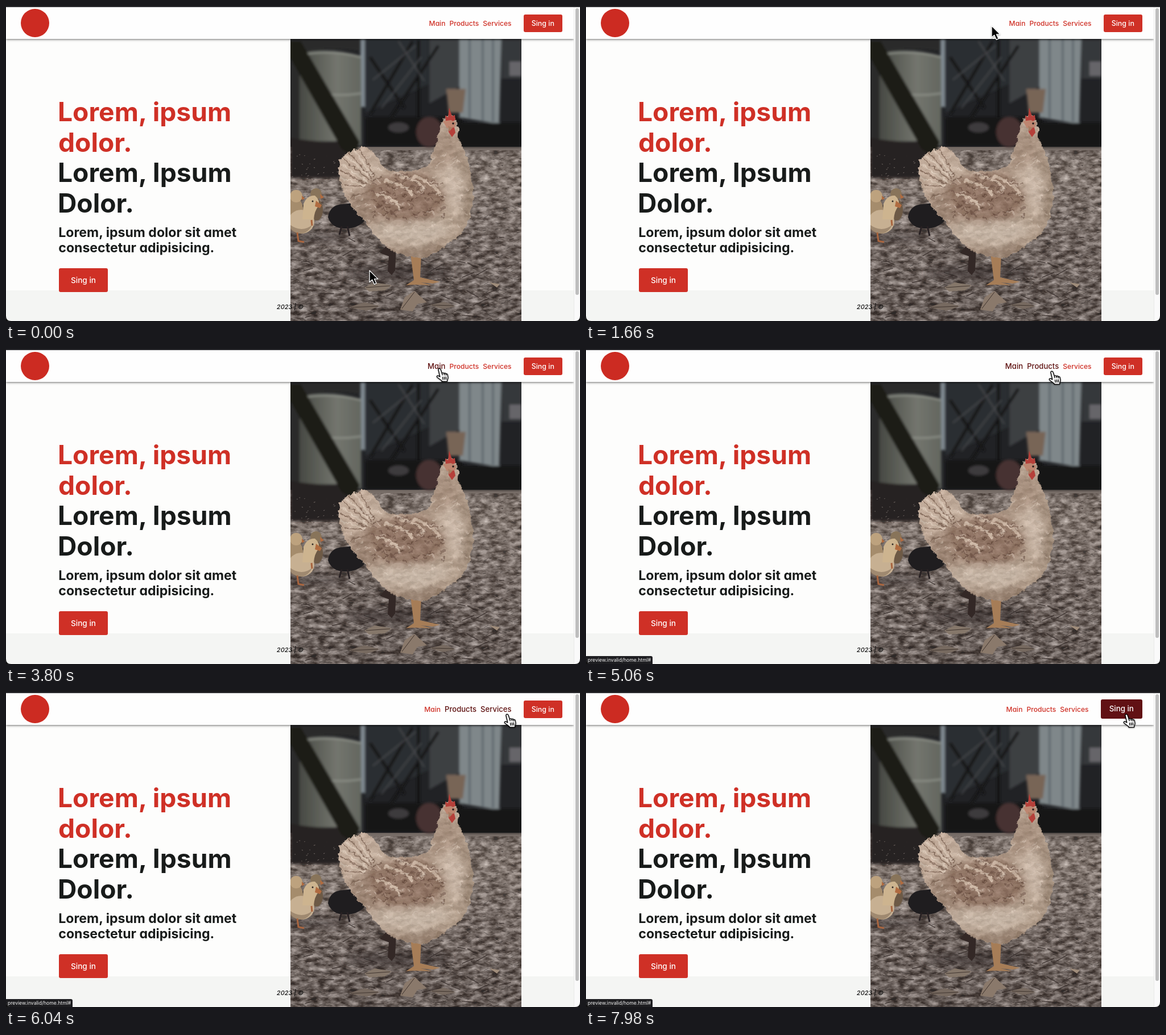
These frames come from a looping animation (1009x555 px, 8 s). An HTML page:

```html
<!DOCTYPE html>
<html lang="en">
<head>
<meta charset="utf-8">
<title>Farm landing page</title>
<style>
  :root { --red: #cf3026; --dark: #5f1211; --ink: #181b1a; }
  html, body { margin: 0; width: 100%; height: 100%; overflow: hidden; background: #fdfdfc; }
  body { position: relative; font-family: Inter, "Open Sans", sans-serif; font-feature-settings: "cv11"; }
  .scene, header, .status, .cursor { position: absolute; }
  .scene { left: 0; top: 0; width: 1009px; height: 555px; }
  .scene text { white-space: pre; }
  .title { font-size: 46.2px; font-weight: 700; }
  .lead { font-size: 23.1px; font-weight: 700; fill: var(--ink); }

  header {
    left: 0; top: 2px; width: 978px; height: 56px; padding-right: 20px;
    display: flex; align-items: center; justify-content: flex-end;
    background: #fefefe; box-shadow: 0 1px 4px rgba(0, 0, 0, .6);
  }
  .logo { position: absolute; left: 26px; top: 3px; width: 50px; height: 50px; border-radius: 50%; background: #cc2b22; }
  .link { margin-right: 7px; color: var(--red); font-size: 12.1px; font-weight: 500; white-space: nowrap; }
  .services { margin-right: 21px; }
  .button {
    height: 2.5em; line-height: 2.5em; padding: 0 1.14em; border-radius: 3px; white-space: nowrap;
    background: var(--red); color: #fff; font-size: 12.4px; font-weight: 500;
    animation: button 8s infinite;
  }
  .main { animation: main 8s infinite; }
  .products { animation: products 8s infinite; }
  .services { animation: services 8s infinite; }
  @keyframes main {
    0%, 39.5%, 69%, 100% { font-size: 12.1px; color: var(--red); }
    46.5%, 63.3% { font-size: 13.2px; color: var(--dark); }
  }
  @keyframes products {
    0%, 56.5%, 81.5%, 100% { font-size: 12.1px; color: var(--red); }
    63%, 75.6% { font-size: 13.1px; color: var(--dark); }
  }
  @keyframes services {
    0%, 69%, 90%, 100% { font-size: 12.1px; color: var(--red); }
    75.3%, 83.5% { font-size: 13.1px; color: var(--dark); }
  }
  @keyframes button {
    0%, 85% { font-size: 12.4px; background: var(--red); }
    91.5%, 100% { font-size: 13.3px; background: #611114; }
  }

  .status {
    left: 0; top: 541px; width: 117px; height: 14px; box-sizing: border-box; padding-left: 3px;
    border-radius: 0 3px 0 7px; background: #1e1e21; color: #f2f2f2;
    font: 8.6px/14px Inter, sans-serif; white-space: nowrap;
    animation: status 8s step-end infinite;
  }
  @keyframes status { 0% { opacity: 0; } 52% { opacity: 1; } }

  .cursor {
    left: 0; top: 0; width: 34px; height: 36px; overflow: visible;
    filter: drop-shadow(0 1px 1px rgba(0, 0, 0, .4));
    animation: travel 8s linear infinite;
  }
  .arrow { animation: arrow 8s step-end infinite; }
  .hand { animation: hand 8s step-end infinite; }
  @keyframes arrow { 0% { opacity: 1; } 39% { opacity: 0; } }
  @keyframes hand { 0% { opacity: 0; } 39% { opacity: 1; } }
  @keyframes travel {
    0% { transform: translate(639px, 466px); }
    3% { transform: translate(639px, 466px); animation-timing-function: ease-in-out; }
    18% { transform: translate(711px, 37px); }
    20.75% { transform: translate(713px, 35px); }
    35.25% { transform: translate(735.5px, 31.5px); }
    39% { transform: translate(744px, 32px); }
    47.5% { transform: translate(761px, 34px); }
    54% { transform: translate(764px, 35px); animation-timing-function: ease-in-out; }
    63.25% { transform: translate(818px, 39px); }
    67% { transform: translate(820px, 39px); animation-timing-function: ease-in-out; }
    75.5% { transform: translate(880px, 39px); }
    79% { transform: translate(882px, 39px); animation-timing-function: ease-in-out; }
    89% { transform: translate(947px, 39px); }
    100% { transform: translate(949px, 39px); }
  }
</style>
</head>
<body>
<svg class="scene" viewBox="0 0 1009 555">
  <defs>
    <clipPath id="frame"><path d="M500 58h406v497H500z"/></clipPath>
    <clipPath id="henShape"><use href="#hen"/></clipPath>
    <filter id="soft"><feGaussianBlur stdDeviation="2"/></filter>
    <filter id="haze" x="-30%" y="-30%" width="160%" height="160%"><feGaussianBlur stdDeviation="7"/></filter>
    <!-- Mottled light and dark over a flat area. -->
    <filter id="mottle" x="0" y="0" width="100%" height="100%" color-interpolation-filters="sRGB">
      <feTurbulence type="fractalNoise" baseFrequency=".06 .13" numOctaves="4" seed="4"/>
      <feColorMatrix values="1.5 0 0 0 -.31  1.5 0 0 0 -.35  1.5 0 0 0 -.37  0 0 0 0 .5"/>
    </filter>
    <!-- Frayed edges, like feathers. -->
    <filter id="fray" x="-5%" y="-5%" width="110%" height="110%">
      <feTurbulence type="fractalNoise" baseFrequency=".12" numOctaves="3" seed="2"/>
      <feDisplacementMap in="SourceGraphic" scale="9" xChannelSelector="R" yChannelSelector="G"/>
    </filter>
    <linearGradient id="ground" x2="0" y2="1">
      <stop offset="0" stop-color="#756b65"/><stop offset=".15" stop-color="#91857d"/>
      <stop offset=".5" stop-color="#776c67"/><stop offset="1" stop-color="#5a514e"/>
    </linearGradient>
    <linearGradient id="barrel">
      <stop offset="0" stop-color="#474943"/><stop offset=".6" stop-color="#73756e"/><stop offset="1" stop-color="#63665f"/>
    </linearGradient>
    <linearGradient id="plumage" x2="1" y2=".5">
      <stop offset="0" stop-color="#d8bfab"/><stop offset=".5" stop-color="#c9b3a0"/><stop offset="1" stop-color="#bfa995"/>
    </linearGradient>
  </defs>

  <path fill="#f4f5f3" d="M0 501h998v54H0z"/>

  <g clip-path="url(#frame)">
    <path fill="#212225" d="M500 58h406v220H500z"/>
    <path fill="url(#ground)" d="M500 248h406v307H500z"/>
    <path d="M500 254h406v301H500z" filter="url(#mottle)"/>
    <g filter="url(#soft)">
      <path fill="#2b2d30" d="M632 58h110v80l-110 50z"/>
      <path fill="#3d4043" d="M744 58h53v84l-53 30z"/>
      <path stroke="#151618" stroke-width="5" fill="none" d="M640 190L715 62M668 210L760 70M640 90l60 90M725 60v150"/>
      <path stroke="#4a4c4f" stroke-width="2" fill="none" d="M645 130l75-60M660 180l70-90M690 62l45 70"/>
      <path fill="#808a92" d="M623 58h8v120h-8z"/>
      <path fill="#7f878a" d="M797 58h74l-4 150-70-12z"/>
      <path stroke="#596166" stroke-width="3" d="M815 58v140M838 58v144M856 58v146"/>
      <path fill="#36373a" d="M872 58h34v70h-34z"/>
      <path fill="#666569" d="M885 98h21v25h-21z"/>
      <path fill="#161618" d="M632 196h170v50H632zM800 206h106v42H800z"/>
      <path fill="#786556" d="M774 146h34l-5 42h-25z"/>
      <ellipse cx="744" cy="222" rx="23" ry="27" fill="#463330"/>
      <ellipse cx="690" cy="214" rx="18" ry="9" fill="#3e3b3c"/>
      <path fill="url(#barrel)" d="M516 84q50-12 108 4l1 158H516z"/>
      <path fill="#2b2c29" d="M500 58h124v22q-60-10-108 4v170h-16z"/>
      <path stroke="#8b8e86" stroke-width="3" fill="none" d="M520 86q50-10 104 4M560 155q30 4 64-1"/>
      <path fill="#252321" d="M500 232q60 12 118 2l-6 52-30 17H500z"/>
      <path fill="#1e1a19" d="M500 62h18l104 178-10 26-22-14L500 92z"/>
    </g>
    <path id="pale" stroke="#b3a79e" stroke-opacity=".55"/>
    <path id="shade" stroke="#2f2827" stroke-opacity=".55"/>
    <path id="twigs" stroke="#352b28" stroke-opacity=".75" stroke-width="1.6"/>
    <g fill="#2d2726" opacity=".5" filter="url(#haze)">
      <ellipse cx="690" cy="470" rx="95" ry="14"/><ellipse cx="540" cy="407" rx="70" ry="8"/>
    </g>

    <g fill="#85776a">
      <path d="M630 496l18-9 30 5-12 9-28 2z"/>
      <path fill="#8a796b" d="M693 535l8-22 17-11 22 20-17 3-8 13z"/>
      <path fill="#776a60" d="M602 531l28-9 28 7-24 8zM745 527l25-6 20 8-22 5z"/>
      <path fill="#a08d7b" d="M850 487l18 3-5 6z"/>
      <path stroke="#40352f" fill="none" d="M633 496l42-3M696 533l22-29M606 531l48-2M749 527l38 1"/>
    </g>

    <g>
      <ellipse cx="546" cy="359" rx="11" ry="19" fill="#6d5a46"/>
      <circle cx="545" cy="331" r="10" fill="#88745a"/>
      <ellipse cx="508" cy="359" rx="14" ry="22" fill="#a58c6c"/>
      <circle cx="510" cy="335" r="11" fill="#bda27e"/>
      <ellipse cx="519" cy="380" rx="23" ry="21" fill="#c7b092"/>
      <path fill="#cdb48f" d="M523 349q6-16 20-15 10 8 6 19-7 8-8 23h-20z"/>
      <path fill="#86715a" opacity=".6" d="M500 386q20 14 38 0-8 16-22 15-10 0-16-6z"/>
      <path fill="#b06b40" d="M545 343l10 8-3 5-9-3zM520 334l5 5-5 3zM552 331l7 6-6 3z"/>
      <circle cx="539" cy="344" r="1.5" fill="#2d2723"/>
      <path stroke="#a8653f" stroke-width="3" fill="none" d="M512 399l2 15 10 2M537 377l1 10"/>
      <path fill="#1f1d1f" d="M566 372q3-22 27-23l36-4v35q-13 13-35 12-22-1-28-20z"/>
      <path stroke="#282123" stroke-width="3" fill="none" d="M590 388l-4 15M600 388l4 17"/>
    </g>

    <path fill="#332826" d="M669 422l17 2-2 42-6 8-7-7 2-26-16-6z"/>
    <path fill="#a67d57" d="M711 436h19l-2 42 35 8-13 3-21-2 20 5-33-1-13 1 14-9z"/>
    <g filter="url(#fray)">
      <path id="hen" fill="url(#plumage)" d="M762 217C763 199 774 190 785 194C797 201 795 222 795 233C807 251 819 291 821 325C822 362 811 395 790 411C769 421 758 440 735 443C699 445 667 430 651 405C639 394 633 376 622 370C600 350 587 322 585 290C584 267 600 256 617 252C631 244 641 251 648 262C659 272 660 285 673 290C701 292 730 292 742 281C749 261 758 241 762 217Z"/>
      <g clip-path="url(#henShape)">
        <g filter="url(#haze)">
          <path fill="#997a67" d="M632 318q45-32 108-24l38 42-26 38-66 9-46-20z"/>
          <path fill="#d5c3b1" d="M640 390q60-8 130-10l20 12-60 30-65-10z"/>
          <path fill="#9d8572" d="M640 412q50 30 130 2l10 40H640z"/>
          <path fill="#a58b78" d="M600 330l30-10 30 62-28 8-30-40z"/>
          <path fill="#a38d79" d="M796 240l34 80-12 80-18 4 4-90z"/>
          <path fill="#b39a86" d="M740 290l22-72 34 10 2 55z"/>
          <path fill="#dcc8b6" d="M762 300l25-30 18 50-12 60z"/>
        </g>
        <path fill="none" stroke="#8f7463" stroke-width="2" d="M592 268l47 39M603 258l40 46M621 251l27 50M588 290l46 23M591 315l42 4M600 337l37-9"/>
        <path fill="none" stroke="#e5d1bf" stroke-width="3" d="M597 263l42 38M612 254l32 46M589 279l46 30M589 303l42 13"/>
        <path fill="none" stroke="#d9c1ad" stroke-width="5" d="M665 308q30 3 50 25M690 300q35 3 45 25M650 332q32 3 42 26M715 300q35 8 50 35"/>
        <path id="flecks" stroke="#65483b" stroke-width="2.4" stroke-opacity=".6"/>
        <path id="down" stroke="#efe0d1" stroke-width="2" stroke-opacity=".45"/>
        <path d="M584 190h240v256H584z" filter="url(#mottle)" opacity=".3"/>
      </g>
    </g>
    <path fill="#b5403a" d="M773 205l-1-12 5 3 2-17 5 15 5-2 1 9-7 3zM778 214l10 0 2 9-6 8-6-9z"/>
    <path fill="#bd8670" d="M768 203l14-2 9 4-2 9-14 1z"/>
    <circle cx="786" cy="207" r="1.8" fill="#241e1c"/>
    <path fill="#a77d62" d="M777 211l8 4-6 6z"/>
  </g>

  <g class="title" fill="#cf3026"><text x="91" y="203">Lorem, ipsum</text><text x="92" y="256.5">dolor.</text></g>
  <g class="title" fill="#181b1a"><text x="91" y="310">Lorem, Ipsum</text><text x="91" y="364">Dolor.</text></g>
  <text class="lead" x="92.3" y="407">Lorem, ipsum dolor sit amet</text>
  <text class="lead" x="92.3" y="434">consectetur adipisicing.</text>
  <rect x="93" y="462" width="86" height="42" rx="3" fill="#cf3026"/>
  <text x="136" y="488" text-anchor="middle" font-size="13.6" font-weight="500" fill="#fff">Sing in</text>
  <text x="499.5" y="534" text-anchor="middle" font-size="11" font-style="italic" font-weight="500" fill="#111">2023 | ©</text>
</svg>

<header>
  <span class="logo"></span>
  <span class="link main">Main</span>
  <span class="link products">Products</span>
  <span class="link services">Services</span>
  <span class="button">Sing in</span>
</header>
<div class="status">preview.invalid/home.html#</div>

<svg class="scene" viewBox="0 0 1009 555">
  <path fill="#fafafa" d="M998 2h11v553h-11z"/>
  <path stroke="#e9e9e9" d="M998.5 2v553"/>
  <rect x="1001" y="4" width="6" height="505" rx="3" fill="#bebebe"/>
  <path fill="#2a2a2e" d="M0 0h1009v2H0z"/>
  <path fill="#111" d="M0 546q0 9 9 9H0zM1009 546q0 9-9 9h9z"/>
</svg>

<svg class="cursor" viewBox="0 0 34 36">
  <path class="arrow" fill="#000" stroke="#fff" stroke-width="1.3" stroke-linejoin="round" d="M0 0v20.5l4.7-4.3 3.7 8.2 3.7-1.7-3.6-7.8h6.3z"/>
  <g class="hand" stroke="#000" stroke-width="1.4" stroke-linejoin="round" stroke-linecap="round">
    <path fill="#fff" d="M-1 2.5C-1.5 0 2.2-.7 3 2l2.4 7c.8-1.7 3-1.4 3.6.2.8-1.2 2.7-.8 3.2.7 1.3-.8 2.7 0 3 1.4l.7 4.2c.4 2.3-.8 4-1.3 5.5v2l-9.4.2-.4-1.5-7.4-5.5c-2.3-1.8-.4-4 1.7-2.9l2.7 1.5z"/>
    <path fill="none" d="M5.4 9l.8 2.8M9 9.2l.6 2.5M12.2 9.9l.4 2.2M6.5 15.5l.6 4.2M9.4 15.3l.5 4.2M12.3 15l.3 4.2"/>
  </g>
</svg>

<script>
  let seed = 7;
  const rand = (lo, hi) => {
    seed = (seed * 16807) % 2147483647;
    return lo + (hi - lo) * seed / 2147483647;
  };

  // Scatters short strokes over a box; with depth they grow towards its lower edge.
  function scatter(id, count, [x0, y0, x1, y1], len, slope, depth) {
    let d = "";
    for (let i = 0; i < count; i++) {
      const y = rand(y0, y1);
      const size = len * rand(.4, 1) * (depth ? .4 + (y - y0) / (y1 - y0) : 1);
      d += `M${rand(x0, x1).toFixed(1)} ${y.toFixed(1)}l${size.toFixed(1)} ${(size * rand(-slope, slope)).toFixed(1)}`;
    }
    document.getElementById(id).setAttribute("d", d);
  }

  const ground = [495, 262, 906, 555];
  scatter("pale", 700, ground, 7, .5, true);
  scatter("shade", 800, ground, 8, .6, true);
  scatter("twigs", 50, [495, 400, 890, 550], 28, .6, true);
  scatter("flecks", 90, [640, 298, 770, 378], 9, .9, false);
  scatter("down", 110, [600, 260, 815, 400], 10, .9, false);
</script>
</body>
</html>
```
